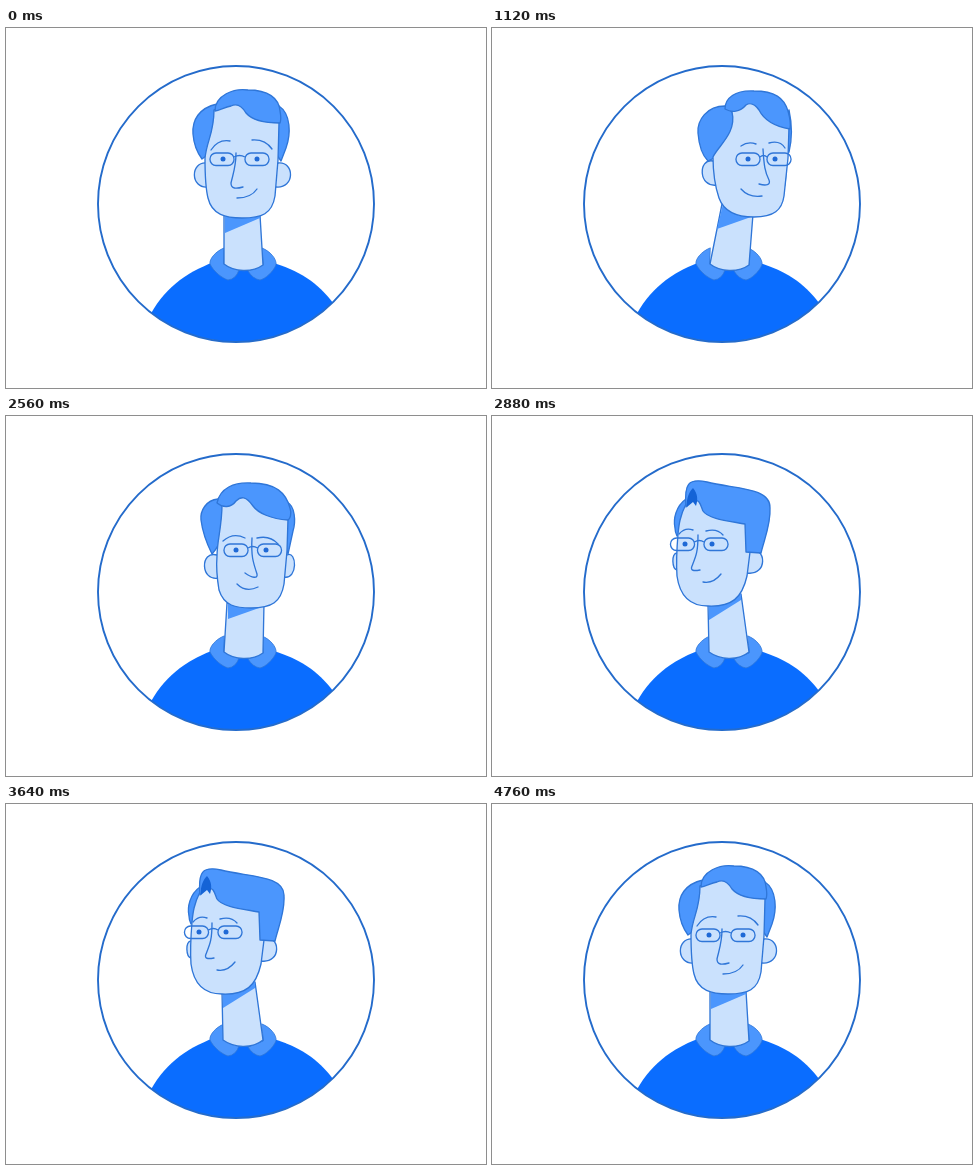
An HTML page that plays this animation: 480x360 px, repeating every 5000 ms.

```html
<!DOCTYPE html>
<html lang="en">
<head>
<meta charset="utf-8">
<title>Portrait</title>
<style>
html, body { margin: 0; width: 100%; height: 100%; overflow: hidden; background: #fff; }
svg { display: block; width: 100vw; height: 100vh; }
.skin { fill: #cae1fd; }
.hair { fill: #4b96fd; }
.line { fill: none; }
.flat { stroke: none; }
</style>
</head>
<body>
<svg viewBox="0 0 480 360" stroke="#2f76d8" stroke-width="1.35" stroke-linecap="round" stroke-linejoin="round">
  <clipPath id="disc"><circle cx="230" cy="176" r="138"/></clipPath>
  <g clip-path="url(#disc)">
    <path class="flat" fill="#0a6dff" d="M142 291C157 261 179 245 208 234H264C293 242 312 255 327 275L340 330H140Z"/>
    <path class="hair" stroke-width=".8" d="M218 220C210 223 203 231 204 236C208 244 216 250 222 252Q230 251 233 242L218 236ZM256 220C264 223 271 231 270 237C267 244 259 251 254 252Q247 251 242 243L257 237Z"/>
    <path id="neck" class="skin"/>
    <path id="shade" class="hair flat"/>
    <path id="ears" class="skin"/>
    <path id="sideL" class="hair"/>
    <path id="sideR" class="hair"/>
    <path id="face" class="skin"/>
    <path id="top" class="hair"/>
    <path id="part" fill="#1463d6" class="flat" d="M195 91C194 81 198 75 201 72C206 78 206 84 204 90L201 86Z"/>
    <path id="lines" class="line"/>
    <g fill="#1f69d6" class="flat"><ellipse id="eyeL" rx="2.5"/><ellipse id="eyeR" rx="2.5"/></g>
    <path id="glasses" class="line"/>
    <g id="hand" class="skin">
      <path d="M110 390L132.5 272L141 218L145 194C141 184 135 176 136 166C137 158 142 155 147 152L178 120Q183 116 183 123L173 143L183 136Q188 139 183 153L182 176Q181 187 174 188C174 205 171 225 170 250L160 390Z"/>
      <path class="line" d="M162 148L174 166M154 154L165 174M150 160V171L160 179Q164 180 165 174Q172 174 174 166Q180 166 181 160M150 160Q150 154 154 154Q157 147 162 148Q166 142 173 144L181 154M160 179L158 186"/>
    </g>
  </g>
  <circle class="line" cx="230" cy="176" r="138" stroke="#246bcb" stroke-width="1.9"/>
</svg>
<script>
// Each part is drawn in five poses: front, right, half right, nod, left.
const parts = {
  neck: [
    'M218 187L218 236C228 244 246 245 257 237L254 187Z',
    'M230 176L218 236C228 244 246 245 257 237L261 186Z',
    'M223 181L218 236C228 244 246 245 257 237L258 184Z',
    'M221 187L218 236C228 244 246 245 257 237L258 187Z',
    'M216 188L217 236C228 244 246 245 257 236L249 178Z'],
  shade: [
    'M219 187L219 205L254 190L254 186Z',
    'M231 176L225 201L259 189L259 184Z',
    'M224 182L222 202L253 187L253 184Z',
    'M222 188L222 203L253 192L253 188Z',
    'M217 188L217 204L249 184L249 178Z'],
  ears: [
    'M201 135C184 133 184 161 202 159M272 135C289 133 289 161 270 159',
    'M221 133C206 130 206 160 225 157M294 136C294 133 294 160 292 158',
    'M209 134C194 131 194 160 212 157M283 134C291 131 292 159 279 156',
    'M211 139C194 134 194 166 213 162M281 139C291 134 292 164 278 161',
    'M185 137C179 137 180 153 185 154M257 134C275 130 276 160 255 157'],
  sideL: [
    'M211 76C193 80 186 92 187 106C188 119 193 127 196 131C206 125 214 105 214 82Z',
    'M233 78C215 78 205 92 206 105C207 118 211 128 216 133C232 126 248 115 247 90Z',
    'M222 78C203 80 196 94 197 105C198 118 204 129 207 134C217 126 230 108 230 83Z',
    'M212 83C200 84 194 95 195 104C197 120 203 132 206 138C217 126 222 105 222 89Z',
    'M194 83C184 90 181 103 183 112C183 114 184 118 185 120C192 114 198 100 198 88Z'],
  sideR: [
    'M273 78C285 86 285 106 280 120L275 133C266 122 266 106 268 92Z',
    'M297 82C300 96 300 112 297 124L296 124C293 115 292 106 293 97Z',
    'M284 83C292 88 292 105 289 118L285 134C278 120 278 108 280 95Z',
    'M281 86C289 90 290 105 287 115L282 138C276 125 276 113 277 100Z',
    'M270 80C276 88 276 105 272 118L268 134C258 125 256 112 256 108Z'],
  face: [
    'M208 82C208 105 201 112 199 130C199 145 199 158 202 170C206 187 220 190 236 190C256 190 266 186 269 168L272 132L273 95L245 70Z',
    'M240 84C245 105 226 118 221 129C221 145 223 158 227 170C232 184 245 189 262 189C282 189 290 182 292 168L296 130L297 99L262 70Z',
    'M224 82C222 105 211 115 209 132C208 148 209 158 212 170C217 183 228 186 245 186C266 187 276 182 279 165L283 130L284 97L240 68Z',
    'M216 89C216 110 211 125 211 140C210 152 211 162 213 174C218 190 230 192 245 192C266 192 275 186 278 168L281 135L282 103L240 74Z',
    'M194 88C188 100 187 108 186 118C185 130 184 145 185 160C188 182 200 190 216 190C240 191 250 182 255 160L258 136L254 108L215 75Z'],
  top: [
    'M209 83C209 67 228 60 242 62C262 62 273 70 274 83C275 88 275 92 274 95L274 95L274 95C256 95 246 92 240 85C236 78 231 75 225 78C219 79 214 82 209 83Z',
    'M233 81C233 70 243 62 262 63C283 63 292 70 296 83C298 90 299 96 298 101L298 101L298 101C280 98 271 90 267 82C262 75 257 75 254 77C248 84 240 85 233 81Z',
    'M221 81C221 70 230 64 245 64C270 63 282 70 284 80C287 88 286 94 284 97L284 97L284 97C265 99 250 92 246 83C242 74 237 73 233 79C229 84 224 82 221 81Z',
    'M211 87C214 72 228 66 245 67C270 67 280 77 284 92C286 98 284 103 282 104L282 104L282 104C265 103 252 97 247 90C240 80 235 80 230 85C225 92 217 92 211 87Z',
    'M194 91C192 68 196 62 215 66C242 73 279 71 278 92C279 108 272 124 269 137L254 136L253 108C237 105 216 103 211 95C209 90 207 82 203 86C199 82 196 88 194 91Z'],
  // brows, nose, mouth
  lines: [
    'M205 122Q212 111 224 113M246 112Q259 111 266 121M230 125C230 139 227 146 225 155C225 161 230 161 237 159M231 170Q245 170 251 161',
    'M249 118Q256 113 264 116M277 115Q288 112 293 120M271 121C272 138 273 144 277 152C279 157 274 158 267 156M249 161Q257 170 270 168',
    'M222 119Q229 109 239 112M256 113Q268 110 273 121M249 119C249 138 251 142 255 151C256 156 251 156 245 154M232 157Q240 166 253 166',
    'M217 125Q227 116 239 122M251 122Q264 119 272 128M246 122C245 140 247 146 251 158C252 163 246 162 239 157M231 168Q240 177 252 171',
    'M187 118Q193 111 201 114M214 115Q225 112 231 119M206 119C206 136 204 140 200 150C198 155 202 155 208 154M211 166Q221 168 229 158']
};
// left lens x, right lens x, lens y, left eye x, right eye x, eye y
const looks = ['204 239 125 217 251 131', '244 275 125 256 283 131', '220 254 123 235 263 128',
  '218 251.5 128 230 260 134', '178.5 212 122 193 220 128'];
// start, steps, pose before, pose after
const turns = [[0, 1, 0, 0], [440, 4, 0, 1], [1480, 3, 1, 2], [2560, 1, 2, 3], [2640, 4, 3, 4], [4520, 4, 4, 0]];
// time, distance of the hand below its place, drop of the glasses
const reach = [[0, 400, 0], [3120, 130, 0], [3200, 70, 0], [3280, 20, 4], [3360, 0, 7.5],
  [3480, 20, 4], [3560, 80, 0], [3640, 400, 0]];
// time, openness of the eyes
const lids = [[0, 1], [1000, .2], [1120, 1], [2080, .2], [2200, 1], [4000, .5], [4080, .2], [4160, 1]];

const el = id => document.getElementById(id);
const set = (id, attrs) => { for (const k in attrs) el(id).setAttribute(k, attrs[k]); };
const latest = (list, t) => list.filter(row => row[0] <= t).pop();
const ease = p => p * p * (3 - 2 * p);

function mix(a, b, p) {
  const ends = b.match(/[\d.]+/g);
  let i = 0;
  return a.replace(/[\d.]+/g, n => (+n + (ends[i++] - n) * p).toFixed(2));
}

const lens = (x, y) => `M${x + 6} ${y}h12a6 6.2 0 0 1 0 12.5h-12a6 6.2 0 0 1 0-12.5Z`;

function draw(t) {
  const [start, steps, from, to] = latest(turns, t);
  const p = ease(Math.min(1, (Math.floor((t - start) / 80) + 1) / steps));
  for (const id in parts) set(id, { d: mix(parts[id][from], parts[id][to], p) });

  const [, low, drop] = latest(reach, t);
  const [x1, x2, y, e1, e2, ey] = mix(looks[from], looks[to], p).split(' ').map(Number);
  const gy = y + drop;
  set('glasses', { d: `${lens(x1, gy)}${lens(x2, gy)}M${x1 + 24} ${gy + 4}Q${(x1 + 24 + x2) / 2} ${gy + 1} ${x2} ${gy + 4}` });
  const ry = 2.5 * latest(lids, t)[1];
  set('eyeL', { cx: e1, cy: ey, ry });
  set('eyeR', { cx: e2, cy: ey, ry });

  const left = (to === 4) * p + (from === 4) * (1 - p);
  set('part', { opacity: left > .8 ? 1 : 0 });
  set('hand', { transform: `translate(${-low * .2} ${low})`, visibility: low < 400 ? 'visible' : 'hidden' });
}

function tick() {
  draw(performance.now() % 5000);
  requestAnimationFrame(tick);
}
tick();
</script>
</body>
</html>
```
